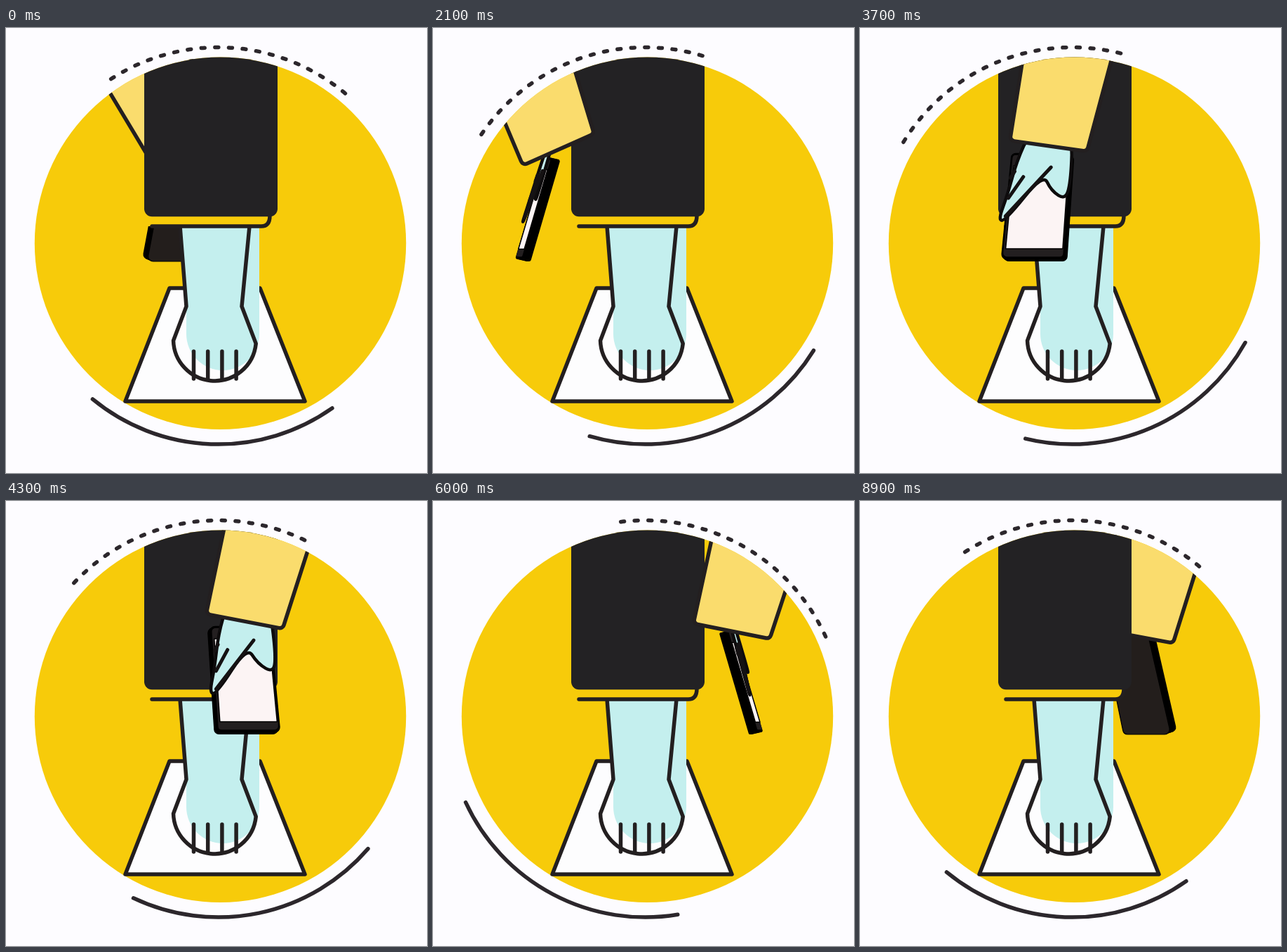
An HTML page with a canvas that plays this animation: 600 px wide and 633 px high, repeating every 9 s.

```html
<!DOCTYPE html>
<html lang="en">
<head>
<meta charset="utf-8">
<title>Foot scan</title>
<style>
html, body { margin: 0; width: 100%; height: 100%; overflow: hidden; background: #fdfcff; }
canvas { display: block; width: 600px; height: 633px; }
</style>
</head>
<body>
<canvas id="stage" width="600" height="633"></canvas>
<script>
const ctx = document.getElementById('stage').getContext('2d');
const LOOP = 9000, STEP = 100, RAD = Math.PI / 180;
const INK = '#231f20', YELLOW = '#f7cb0a', SLEEVE = '#fadc6d', SKIN = '#c4efee', PAPER = '#fdfdfe';

// The phone circles the leg: time, x of its foot, turn (0 behind, 180 in front), cuff tilt.
const PATH = [
  [0, 237, 34, -32],
  [1400, 128, 71.5, -33],
  [2800, 128, 123, -8.5],
  [3700, 248, 163, 8],
  [4900, 414, 227, 12],
  [7200, 482, 295, 10.5],
  [8900, 414, 315, 10.5]
];

// Smooth curve through one column of the path, without overshoot.
function along(col, t) {
  const last = PATH.length - 1;
  const slope = n => (PATH[n + 1][col] - PATH[n][col]) / (PATH[n + 1][0] - PATH[n][0]);
  const tangent = n => {
    if (n === 0) return slope(0);
    if (n === last) return slope(n - 1);
    const p = slope(n - 1), q = slope(n);
    return p * q <= 0 ? 0 : 2 * p * q / (p + q);
  };
  let i = 0;
  while (i < last - 1 && t >= PATH[i + 1][0]) i++;
  const span = PATH[i + 1][0] - PATH[i][0], u = (t - PATH[i][0]) / span, w = 1 - u;
  return PATH[i][col] * (1 + 2 * u) * w * w + PATH[i + 1][col] * u * u * (3 - 2 * u)
    + span * u * w * (tangent(i) * w - tangent(i + 1) * u);
}

function ease(t, from, to) {
  const u = Math.min(1, Math.max(0, (t - from) / (to - from)));
  return u < .5 ? 4 * u ** 3 : 1 - 4 * (1 - u) ** 3;
}

function fill(color) { ctx.fillStyle = color; ctx.fill(); }

function stroke(width, color = INK) {
  ctx.lineWidth = width;
  ctx.strokeStyle = color;
  ctx.stroke();
}

function poly(points, close) {
  ctx.beginPath();
  points.forEach(p => ctx.lineTo(...p));
  if (close) ctx.closePath();
}

const mid = (a, b) => [(a[0] + b[0]) / 2, (a[1] + b[1]) / 2];

function rounded(p, r) {
  ctx.beginPath();
  ctx.moveTo(...mid(p[0], p[p.length - 1]));
  p.forEach((a, i) => ctx.arcTo(...a, ...p[(i + 1) % p.length], r));
  ctx.closePath();
}

function smooth(p) {
  ctx.beginPath();
  ctx.moveTo(...mid(p[0], p[p.length - 1]));
  p.forEach((a, i) => ctx.quadraticCurveTo(...a, ...mid(a, p[(i + 1) % p.length])));
  ctx.closePath();
}

const box = (l, t, r, b) => [[l, t], [r, t], [r, b], [l, b]];

// Everything about the arm follows from where it is on its way round.
function pose(t) {
  const turn = along(2, t) * RAD, sin = Math.sin(turn), cos = Math.cos(turn);
  const x = along(1, t), top = 186 + 7 * cos, low = 330.5;
  const lean = 43 * sin, wide = -95 * cos, depth = [13 * sin, 3];
  // Point of the phone at (u, v) of its screen face, set back by k of its depth.
  const at = (u, v, k = 0) => [
    x + lean * (1 - v) + wide * (u - .5) * (.95 + .05 * v) + depth[0] * (k - .5),
    top + (low - top) * v + depth[1] * (k - .5)
  ];
  const face = (points, k) => points.map(([u, v]) => at(u, v, k));
  const cuff = { x: x + lean + 8, y: 180 + 11 * cos - 6 * sin, tilt: along(3, t) * RAD };
  return { sin, face, cuff, front: cos < 0, size: Math.abs(wide) };
}

function drawArcs(t) {
  const turn = 25.7 * (-ease(t, 1000, 2560) + 2 * ease(t, 3700, 5260) - ease(t, 5950, 7100));
  const arc = (from, to) => {
    ctx.beginPath();
    ctx.arc(302.6, 309.8, 282.3, (from + turn) * RAD, (to + turn) * RAD);
    stroke(5.5, '#2c272c');
  };
  for (let i = 0; i < 19; i++) {
    const a = -122.3 + i * 3.98;
    arc(a - .5, a + .5);
  }
  arc(54.9, 129.4);
}

function disc() {
  ctx.beginPath();
  ctx.arc(305.5, 306.3, 264.7, 0, 7);
}

function drawPaper() {
  poly([[233, 370], [362, 370], [426, 531], [170, 531]], true);
  fill(PAPER);
  stroke(5.5);
}

function footPath() {
  ctx.beginPath();
  ctx.moveTo(347, 282);
  ctx.lineTo(336, 396);
  ctx.arc(297.5, 443, 59, .1, Math.PI - .03);
  ctx.lineTo(257, 396);
  ctx.lineTo(248, 282);
}

function drawLeg() {
  footPath();
  fill(PAPER);
  ctx.beginPath();
  ctx.moveTo(249, 282);
  ctx.lineTo(257, 396);
  ctx.arc(309, 435, 52, Math.PI, 0, true);
  ctx.lineTo(361, 282);
  fill(SKIN);
  footPath();
  stroke(5.5);
  for (let i = 0; i < 4; i++) {
    const x = 267.5 + i * 20.2;
    poly([[x, 460], [x, 499]]);
    stroke(5.5);
  }
}

function drawTrousers() {
  const hem = x => {
    ctx.beginPath();
    ctx.moveTo(x, 282);
    ctx.lineTo(364, 282);
    ctx.quadraticCurveTo(376, 282, 376, 267);
  };
  hem(201);
  ctx.lineTo(201, 262);
  fill(YELLOW);
  hem(208);
  stroke(5.5);
  ctx.beginPath();
  ctx.roundRect(197, 20, 190, 248.3, [0, 0, 11, 11]);
  fill('#232224');
}

function drawPhone({ face, front, size }) {
  const r = Math.min(7, size * .3), body = box(0, 0, 1, 1);
  for (let k = 0; k <= 6; k++) {
    rounded(face(body, front ? 1 - k / 6 : k / 6), r);
    fill('#000');
  }
  if (front) {
    rounded(face(box(.03, .02, .97, .975)), r * .7);
    fill(INK);
    poly(face(box(.06, .12, .96, .9)), true);
    fill('#fcf4f4');
    stroke(1.5, '#000');
  } else {
    rounded(face(body, 1), r);
    fill('#231e1c');
    stroke(1.2, '#000');
  }
}

function drawPalm({ face }) {
  const lift = -.3;
  smooth(face([[.3, -.2], [.12, .08], [.02, .4], [-.09, .64], [.03, .64], [.57, .2],
    [.72, .36], [.97, .45], [1.03, .25], [1, -.2]], lift));
  fill(SKIN);
  stroke(4.5, '#0d0b0c');
  for (const crease of [[[.69, .14], [.02, .6]], [[.25, .23], [.04, .43]], [[.1, .18], [.04, .24]]]) {
    poly(face(crease, lift));
    stroke(5, '#151213');
  }
}

// Fingers reaching round the phone, seen only from the left.
function drawFingers({ face, sin }) {
  const reach = Math.max(0, sin) ** 4;
  const shape = [[.4, -.14], [1.6, .05], [1.48, .3], [1.3, .66], [1.1, .62], [.8, .1], [.2, 0]];
  rounded(face(shape.map(([u, v]) => [u < 1 ? u : 1 + (u - 1) * reach, v]), .2), 3);
  fill(SKIN);
  stroke(4.5, '#0d0b0c');
}

function drawSleeve({ cuff }) {
  const edge = (side, flare) => {
    const x = cuff.x + side * Math.cos(cuff.tilt), y = cuff.y + side * Math.sin(cuff.tilt);
    const up = cuff.tilt + flare * RAD;
    return [[x, y], [x + 170 * Math.sin(up), y - 170 * Math.cos(up)]];
  };
  const [a, aTop] = edge(-55.5, 1), [b, bTop] = edge(55.5, 7);
  ctx.beginPath();
  ctx.moveTo(...aTop);
  ctx.arcTo(...a, ...b, 6);
  ctx.arcTo(...b, ...bTop, 6);
  ctx.lineTo(...bTop);
  fill(SLEEVE);
  stroke(5.5);
}

function drawArm(p) {
  if (!p.front) drawFingers(p);
  drawPhone(p);
  if (p.front) drawPalm(p);
  drawSleeve(p);
}

function clipped(paint) {
  ctx.save();
  disc();
  ctx.clip();
  paint();
  ctx.restore();
}

function draw(t) {
  const p = pose(t);
  ctx.fillStyle = '#fdfcff';
  ctx.fillRect(0, 0, 600, 633);
  ctx.lineCap = ctx.lineJoin = 'round';
  drawArcs(t);
  disc();
  fill(YELLOW);
  if (!p.front) clipped(() => drawArm(p));
  drawPaper();
  drawLeg();
  clipped(drawTrousers);
  if (p.front) clipped(() => drawArm(p));
}

const start = performance.now();
function tick() {
  const t = (performance.now() - start) % LOOP;
  draw(Math.floor(t / STEP) * STEP);
  requestAnimationFrame(tick);
}
tick();
</script>
</body>
</html>
```
